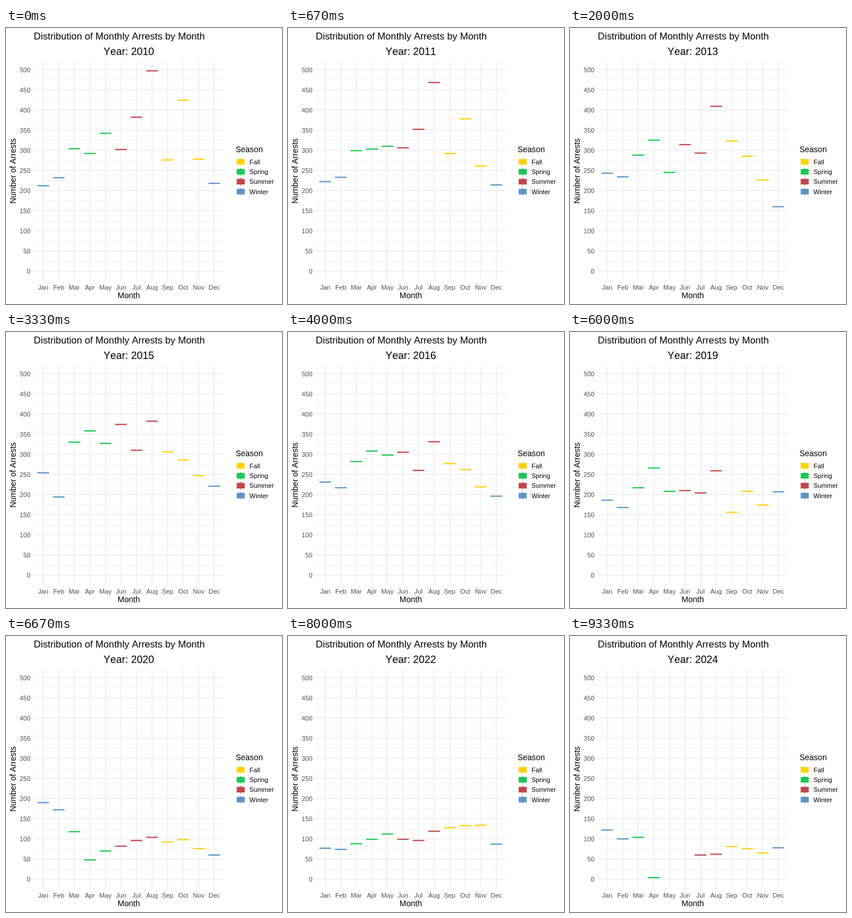
An HTML page for the animation above (10 s loop, 480 by 480 pixels).

```html
<!DOCTYPE html>
<html lang="en">
<head>
<meta charset="utf-8">
<title>Monthly arrests</title>
<style>
  html, body { margin: 0; width: 100%; height: 100%; overflow: hidden; background: #fff; }
  svg { display: block; width: 480px; height: 480px; }
  text { font-family: "Liberation Sans", Arial, Helvetica, sans-serif; font-kerning: none; }
</style>
</head>
<body>
<svg id="chart" viewBox="0 0 480 480"></svg>
<script>
const svg = document.getElementById('chart');
const MONTHS = 'Jan Feb Mar Apr May Jun Jul Aug Sep Oct Nov Dec'.split(' ');
const SEASONS = { Fall: '#fdd10b', Spring: '#1ac755', Summer: '#c1474b', Winter: '#5c95c5' };
const SEASON_ORDER = ['Winter', 'Spring', 'Summer', 'Fall'];
const PANEL = { left: 48.5, right: 378.5, top: 57, bottom: 440 };
const FIRST = 2010, YEARS = 15, LOOP = 10000;

// Monthly counts; years without a row lie between their neighbours.
const COUNTS = {
  2010: [212, 232, 304, 292, 342, 302, 382, 497, 276, 424, 278, 218],
  2013: [243, 234, 288, 325, 245, 314, 293, 409, 323, 285, 226, 160],
  2015: [254, 194, 330, 358, 327, 374, 310, 382, 306, 286, 247, 221],
  2017: [208, 239, 233, 257, 268, 235, 209, 279, 247, 237, 191, 171],
  2019: [186, 168, 217, 266, 208, 210, 204, 259, 156, 208, 174, 207],
  2020: [190, 172, 118, 48, 70, 82, 96, 104, 92, 98, 76, 60],
  2021: [44, 28, 56, 62, 68, 74, 78, 86, 92, 88, 80, 70],
  2022: [77, 74, 88, 99, 112, 99, 96, 119, 128, 133, 134, 87],
  2024: [122, 100, 104, 4, null, null, 60, 62, 81, 76, 65, 78]
};
const EXCEPTIONS = {
  2011: { Dec: 214 }, 2012: { Dec: 206 }, 2014: { Dec: 196 },
  2018: { Dec: 166 }, 2023: { May: 1 }
};

const unit = (PANEL.right - PANEL.left) / 12.2;
const xOf = i => PANEL.left + (0.6 + i) * unit;
const yOf = v => 423 - v * 0.7012;

function add(tag, attrs) {
  const el = document.createElementNS('http://www.w3.org/2000/svg', tag);
  for (const key in attrs) el.setAttribute(key, attrs[key]);
  return svg.appendChild(el);
}
function line(x1, y1, x2, y2, stroke, width) {
  return add('line', { x1, y1, x2, y2, stroke, 'stroke-width': width });
}
function label(str, x, y, size, anchor = 'start', fill = '#000', extra = {}) {
  const el = add('text', { x, y, 'font-size': size, 'text-anchor': anchor, fill, ...extra });
  el.textContent = str;
  return el;
}

function countsFor(year) {
  if (COUNTS[year]) return COUNTS[year];
  let a = year, b = year;
  while (!COUNTS[a]) a--;
  while (!COUNTS[b]) b++;
  const k = (year - a) / (b - a);
  return MONTHS.map((m, i) => {
    const fixed = EXCEPTIONS[year] && EXCEPTIONS[year][m];
    if (fixed) return fixed;
    const from = COUNTS[a][i], to = COUNTS[b][i];
    return to === null ? from : Math.round(from + (to - from) * k);
  });
}

// Grid and axes
for (let v = 25; v < 500; v += 50) line(PANEL.left, yOf(v), PANEL.right, yOf(v), '#ebebeb', 0.7);
for (let v = 0; v <= 500; v += 50) {
  line(PANEL.left, yOf(v), PANEL.right, yOf(v), '#ebebeb', 1.4);
  label(v, 42.4, yOf(v) + 4.1, 11.2, 'end', '#4d4d4d');
}
MONTHS.forEach((m, i) => {
  line(xOf(i), PANEL.top, xOf(i), PANEL.bottom, '#ebebeb', 1.4);
  label(m, xOf(i), 455, 11.2, 'middle', '#4d4d4d');
});
const midX = (PANEL.left + PANEL.right) / 2;
label('Month', midX, 470, 14, 'middle');
label('Number of Arrests', 0, 0, 14, 'middle', '#000', { transform: 'translate(17 248.7) rotate(-90)' });
label('Distribution of Monthly Arrests by Month', 48.3, 20, 16.8);
const yearLabel = label('', midX, 47, 18, 'middle');

// Legend
label('Season', 399.2, 216, 14);
Object.entries(SEASONS).forEach(([name, color], i) => {
  const x = 408.2, y = 232.7 + i * 17.28;
  line(x, y - 6.9, x, y + 6.9, color, 1.07);
  add('rect', { x: x - 7, y: y - 4.85, width: 14, height: 9.7, fill: color });
  label(name, 423.6, y + 4.1, 11.2);
});

// One bar per month
const bars = MONTHS.map((m, i) => {
  const season = SEASON_ORDER[Math.floor((i + 1) % 12 / 3)];
  const half = unit * 0.375;
  return line(xOf(i) - half, 0, xOf(i) + half, 0, SEASONS[season], 2.13);
});

const table = Array.from({ length: YEARS }, (_, i) => countsFor(FIRST + i));
const starts = table.map((_, i) => Math.round(i * LOOP / YEARS / 10) * 10);
let shown = -1;

function show(step) {
  if (step === shown) return;
  shown = step;
  yearLabel.textContent = 'Year: ' + (FIRST + step);
  bars.forEach((bar, i) => {
    const v = table[step][i];
    bar.setAttribute('visibility', v === null ? 'hidden' : 'visible');
    bar.setAttribute('y1', yOf(v));
    bar.setAttribute('y2', yOf(v));
  });
}

const begin = performance.now();
function tick() {
  const t = Math.max(0, performance.now() - begin) % LOOP;
  show(starts.filter(s => s <= t).length - 1);
  requestAnimationFrame(tick);
}
tick();
</script>
</body>
</html>
```
